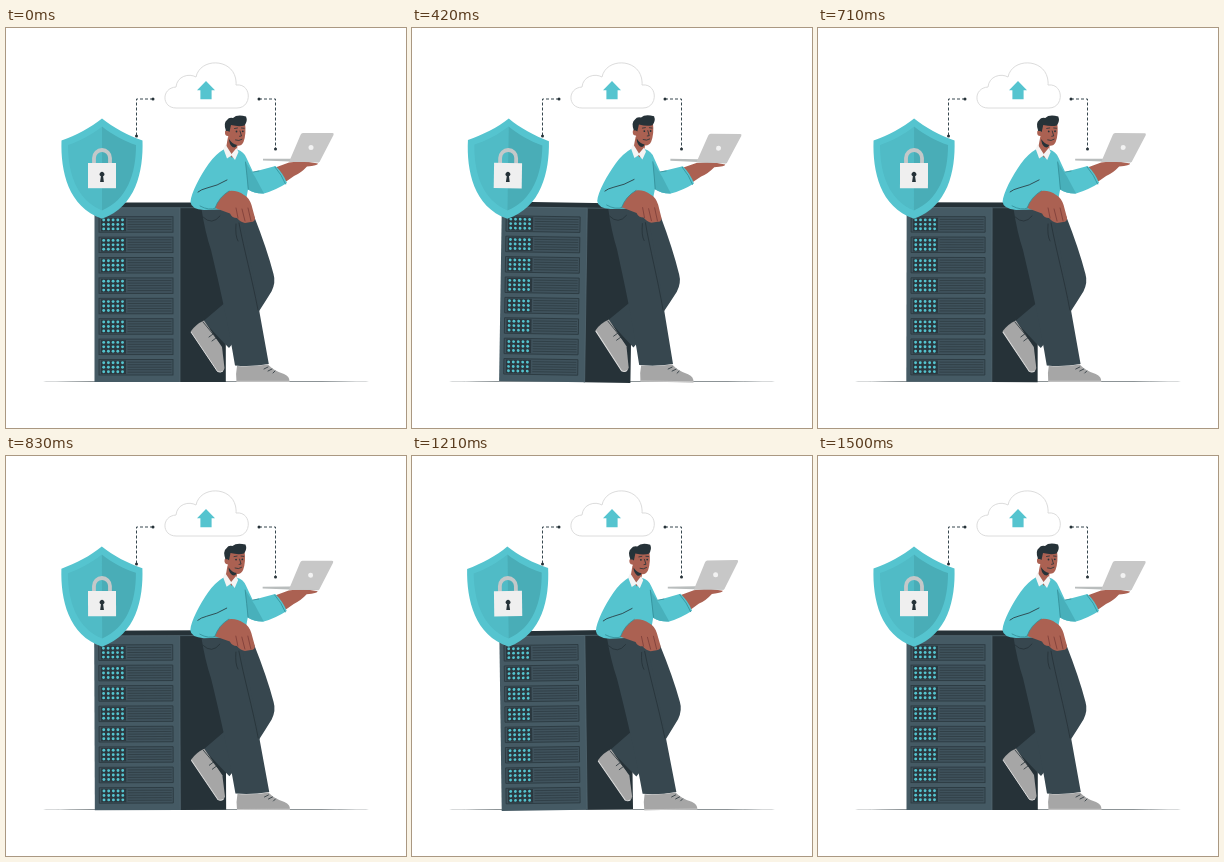
An HTML page for the animation above (1540 ms loop, 400x400 px).

```html
<!DOCTYPE html>
<html lang="en">
<head>
<meta charset="utf-8">
<title>Secure server</title>
<style>
  html, body { margin: 0; width: 100%; height: 100%; overflow: hidden; background: #fff; }
  svg { display: block; width: 100vw; height: 100vh; }
  .teal { fill: #55c4cf; }
  .slate { fill: #37474f; }
  .steel { fill: #455a64; }
  .ink { fill: #263238; }
  .skin { fill: #ab6152; }
  .line { fill: none; stroke: #263238; stroke-width: .8; stroke-linecap: round; stroke-linejoin: round; }
  .fold { fill: none; stroke: #348e98; stroke-width: .8; stroke-linecap: round; }
</style>
</head>
<body>
<svg viewBox="0 0 400 400">
  <ellipse class="ink" cx="200" cy="353.6" rx="163" ry=".45" opacity=".7"/>

  <g id="cloud">
    <path d="M170 80 C155.500 80 155 60 170 59 C171 48 183 45 190 49 C194 30 225 30 229.500 50 C230 53 230.300 55 230 57 C246 55 246.500 80 231 80 Z" fill="#fff" stroke="#dcdcdc"/>
    <path class="teal" d="M200 53 L209 62.300 H205.600 V71.300 H194.400 V62.300 H191 Z"/>
  </g>

  <g id="links">
    <path d="M147 71 H130.500 V108 M253 71 H269.500 V121" fill="none" stroke="#37474f" stroke-dasharray="3 2"/>
    <g class="ink">
      <circle cx="147" cy="71" r="1.500"/><circle cx="130.500" cy="108" r="1.500"/>
      <circle cx="253" cy="71" r="1.500"/><circle cx="269.500" cy="121" r="1.500"/>
    </g>
  </g>

  <g id="server">
    <path class="ink" d="M89 174.500 H196 L219.800 177 V354 H173 V180 H88.500 Z"/>
    <rect class="steel" x="88.500" y="179.500" width="85.500" height="174.500"/>
    <path d="M88.500 179.700 H195 M174 180 V354" fill="none" stroke="#566b75" stroke-width=".7"/>
    <g id="units"></g>
  </g>

  <g id="shield">
    <path class="teal" d="M96 90.500 C85 99.500 70 107.500 55.500 112.500 C54.500 143 62 179 96 190.700 C130 179 137.500 143 136.500 112.500 C122 107.500 107 99.500 96 90.500 Z"/>
    <path d="M96 98.500 C86 106.500 74 113 62 117 C62 146 71 172 96 182.500 Z" fill="#50bbc6"/>
    <path d="M96 98.500 C106 106.500 118 113 130 117 C130 146 121 172 96 182.500 Z" fill="#49adb7"/>
    <path d="M88 136 V130 A8 8 0 0 1 104 130 V136" fill="none" stroke="#c4c8c9" stroke-width="3.800"/>
    <rect x="82" y="135" width="28" height="25.200" fill="#efefef"/>
    <path class="ink" d="M94.900 148.300 L94.100 154 H97.900 L97.100 148.300 A2.300 2.300 0 1 0 94.900 148.300 Z"/>
  </g>

  <g id="man">
    <!-- bent leg -->
    <path class="slate" d="M228 180 L248 188 Q261 221 267.500 246 Q270 254.500 265.500 263.500 Q259 274 252.500 284 L223 320 Q214 311 197.500 293 L234 262 Z"/>
    <path d="M198 292.500 Q190 296 184.700 303.500 L211.500 343.500 Q217.500 345.500 218.500 340 L216 319 Z" fill="#a6a6a6"/>
    <path d="M185 304 L211.500 343.500 Q214.500 345 217 343" fill="none" stroke="#dedede"/>
    <path class="line" d="M197 294 L216 317 M203 309 l4 -3 M206 313 l4 -3"/>
    <!-- standing leg -->
    <path class="slate" d="M195.500 181 L234 181 C239 207 247 243 252 276 L262.800 336 Q246 339 229 337.500 C222 295 214 260 205 222 Q199 204 195.500 181 Z"/>
    <path class="line" d="M233 195 C238 222 246 250 252 282 M197 189 Q206 198 214 188 M230 196 Q229 208 232 213"/>
    <path d="M231 338 Q247 339 262 336.500 Q268 343 278 346 Q284 348.500 283.500 354 H230.500 Q229.500 345 231 338 Z" fill="#a6a6a6"/>
    <path d="M230.500 353.300 H283.500" stroke="#c9c9c9"/>
    <path class="line" d="M258 341 l4 -2 M262 343 l4 -2 M267 345 l2 -2"/>

    <!-- laptop and far hand -->
    <path class="skin" d="M268 140 L283 134.500 L297 133 L312 135.500 Q312 137.500 301 138.500 Q295 145 288 148 L278 155 Z"/>
    <path d="M257 130.700 H284 L313 133 V134.500 L284 133.500 L257 132.600 Z" fill="#b9bdbd"/>
    <path d="M297 105 H326.500 Q328.300 105.200 327.500 107 L313.500 134 H283 L294.500 107 Q295.300 105 297 105 Z" fill="#c7c7c7"/>
    <circle cx="305" cy="119.500" r="2.500" fill="#f2f2f2"/>

    <!-- sweater -->
    <path class="teal" d="M231 121.500 Q238 123.500 240.500 130 L247 144 L269.500 138 Q277 145 281 155 Q270 162 258 165.500 Q249 166 242 161.500 L240 172 L230 181 L198 182 Q185 181 184.500 174 C185 165 194 148 202.500 136 Q209 126.500 219 120.500 Z"/>
    <path d="M239.500 134 Q250 149 258 165.500 Q249 166 242 161.500 Z" fill="#48b0bb"/>
    <path class="fold" d="M239.500 134 Q241 147 242.300 161 M194 178 Q203 183 210 180"/>
    <path class="line" d="M221 152 Q211 158 201 160 Q195 161.500 192 164"/>
    <path class="fold" d="M269 139 Q276 147 279.500 156 M247 144 L253 143"/>

    <!-- neck, collar, head -->
    <path class="skin" d="M222 109 L232 112 L231 122 L226 130 L220 120 Z"/>
    <path d="M219.500 116.500 L225.500 126 L230.500 120 L232.500 124 L229 132 L225.500 127.500 L221 130.500 L217.500 121 Z" fill="#f4f4f4"/>
    <path class="skin" d="M222 95 H239 Q240.500 106 237.500 114 Q235 119 230 117.500 Q224 115 222 108 Q218.500 108 219 103.500 Q220 101 222 102 Z"/>
    <path class="ink" d="M220 103 Q217 95 221 92 Q223 89 227 90 Q231 86 240 88.500 Q242 93 238.500 97.500 Q233 99 225 97 L223.500 104 L222 103 Z"/>
    <path class="ink" d="M223 111 Q226 116 231 117 Q230 120.500 226.500 119 Q223 116 223 111 Z"/>
    <path class="line" d="M228.500 100.500 l3 -.5 M235.500 100 l2.700 .3 M234 103 l1.500 5 l-2 .3 M229.500 112 Q233 113.500 236 111.300"/>
    <circle class="ink" cx="230.500" cy="103.500" r=".9"/><circle class="ink" cx="236.800" cy="103.300" r=".9"/>

    <!-- near hand -->
    <path class="skin" d="M223 163 Q231 162 238 167 Q243 169.500 245.500 177 L249 190 Q249 194 245 194 L239 195 Q234 194 231 190 Q226 190 224 185.500 L209 180 Q213 169 223 163 Z"/>
    <path d="M242 180 L245 193 M236 181 L239 193 M230 180 L232 190" fill="none" stroke="#7c3d38" stroke-width=".8" stroke-linecap="round"/>
    <path class="fold" d="M223 163 Q213 169 209 180"/>
  </g>
</svg>
<script>
const NS = 'http://www.w3.org/2000/svg';
const byId = id => document.getElementById(id);

function add(parent, tag, attrs) {
  const el = document.createElementNS(NS, tag);
  for (const key in attrs) el.setAttribute(key, attrs[key]);
  parent.appendChild(el);
  return el;
}

function drawUnit(y) {
  const unit = add(byId('units'), 'g', { transform: `translate(93 ${y})` });
  add(unit, 'rect', { width: 74, height: 15.5, fill: '#3f525c', stroke: '#2c3a41', 'stroke-width': .9 });
  add(unit, 'rect', { x: 2, y: 1, width: 25, height: 13.5, fill: '#2b383f' });
  for (let row = 0; row < 3; row++)
    for (let col = 0; col < 5; col++)
      add(unit, 'circle', { cx: 4.7 + col * 4.7, cy: 3.3 + row * 4.45, r: 1.45, class: 'teal' });
  for (let i = 0; i < 5; i++)
    add(unit, 'path', { d: `M28.500 ${2.7 + i * 2.5} H72.500`, stroke: '#303f46', 'stroke-width': .9 });
}
for (let i = 0; i < 8; i++) drawUnit(188.7 + i * 20.4);

// Each part sways about its own centre.
const parts = [['server', 154, 264], ['shield', 96, 140.6], ['man', 256, 220.5]]
  .map(([id, x, y]) => ({ el: byId(id), x, y }));
const LOOP = 1540, STEPS = 36, STEP = 1500 / STEPS;

// Linear sway: 0 -> 1 -> -1 -> 0 degrees.
function sway(p) {
  if (p < .25) return 4 * p;
  return p < .75 ? 2 - 4 * p : 4 * p - 4;
}

const start = performance.now();
function render(now) {
  const t = Math.max(0, now - start) % LOOP;
  const step = Math.min(STEPS, Math.floor((t + 5) / STEP));
  const angle = sway(step / STEPS);
  for (const { el, x, y } of parts) el.setAttribute('transform', `rotate(${angle} ${x} ${y})`);
  requestAnimationFrame(render);
}
render(start);
</script>
</body>
</html>
```
